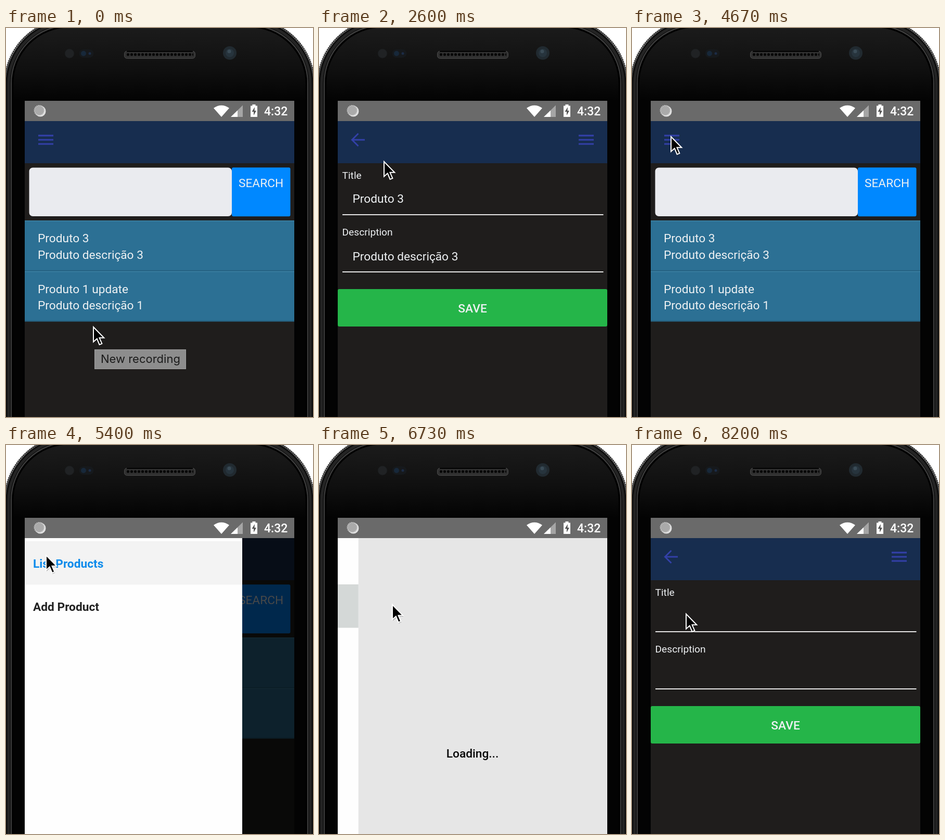
An HTML page that plays this animation: 590x748 px, repeating every 8270 ms.

```html
<!DOCTYPE html>
<html lang="en">
<head>
<meta charset="utf-8">
<title>Product app</title>
<style>
  html, body { margin: 0; width: 100%; height: 100%; overflow: hidden; background: #fff; }
  svg { display: block; width: 590px; height: 748px; }
  text { font: 22.7px Roboto, sans-serif; fill: #eef1f3; white-space: pre; }
  .medium { font-weight: 500; }
  .bold { font-weight: 700; }
  .label { font-size: 19.2px; }
  .tip { font: 22px Inter, sans-serif; fill: #1b1b1b; }
</style>
</head>
<body>
<svg viewBox="0 0 590 748">
  <defs>
    <linearGradient id="rim" x1="0" y1="0" x2="0" y2="1">
      <stop offset="0" stop-color="#444"/>
      <stop offset=".06" stop-color="#777"/>
      <stop offset=".16" stop-color="#3c3c3c"/>
      <stop offset="1" stop-color="#2a2a2a"/>
    </linearGradient>
    <linearGradient id="face" gradientUnits="userSpaceOnUse" x1="0" y1="0" x2="0" y2="140">
      <stop offset="0" stop-color="#1b1b1b"/>
      <stop offset=".55" stop-color="#101010"/>
      <stop offset="1" stop-color="#030303"/>
    </linearGradient>
    <pattern id="holes" width="7" height="7" x="231" y="47.5" patternUnits="userSpaceOnUse">
      <circle cx="3.5" cy="3.5" r="2.6" fill="#030303"/>
    </pattern>
    <clipPath id="screen"><path d="M36 140H554V748H36Z"/></clipPath>
    <g id="bars" fill="#3340a8">
      <path d="M0 0H29V3.200H0ZM0 8.100H29V11.300H0ZM0 16.100H29V19.300H0Z"/>
    </g>
  </defs>

  <!-- Phone body -->
  <rect x="-2" y="-17" width="594" height="900" rx="125" fill="#0b0b0b" stroke="url(#rim)" stroke-width="3"/>
  <rect x="-2.500" y="-17.500" width="595" height="901" rx="125.500" fill="none" stroke="#333" stroke-width="3" stroke-dasharray="2 2"/>
  <rect x="5" y="-10" width="580" height="900" rx="117" fill="none" stroke="#242424" stroke-width="5"/>
  <rect x="10" y="-5" width="570" height="900" rx="111" fill="url(#face)" stroke="#404040" stroke-width="2"/>
  <rect x="13" y="-2" width="564" height="900" rx="108" fill="none" stroke="#000" stroke-width="3"/>
  <circle cx="122" cy="49" r="9" fill="#202224" stroke="#181a1b"/>
  <rect x="140.500" y="41" width="28" height="16" rx="8" fill="#16191c"/>
  <circle cx="149" cy="49" r="5" fill="#17283a"/>
  <circle cx="161" cy="49" r="2.500" fill="#1c2c46"/>
  <rect x="227.500" y="44.500" width="136" height="14" rx="5" fill="#303030" stroke="#4c4c4c"/>
  <rect x="231" y="47.500" width="129" height="7" fill="url(#holes)"/>
  <path d="M232 45H359" stroke="#000" stroke-width="2"/>
  <circle cx="430" cy="48" r="13" fill="#212a30"/>
  <circle cx="430" cy="48" r="8" fill="#27343d"/>
  <circle cx="429" cy="45" r="3.500" fill="#3a4b56"/>

  <g clip-path="url(#screen)">
    <rect x="36" y="179" width="518" height="569" fill="#1f1d1c"/>
    <g id="list">
      <path d="M36 179H554V260H36Z" fill="#172d4f"/>
      <use href="#bars" x="62" y="205.300"/>
      <rect x="44.500" y="268.500" width="389.500" height="93.500" rx="7" fill="#eaebef"/>
      <rect x="434" y="268.200" width="112.500" height="94" rx="3" fill="#0088ff"/>
      <text x="447" y="306">SEARCH</text>
      <path d="M36 370H554V564.500H36Z" fill="#2c7094"/>
      <path d="M36 371H554M36 468.500H554" stroke="#3c81a3" stroke-width="1.500"/>
      <path d="M36 466.500H554M36 563.500H554" stroke="#245e7d" stroke-width="1.500"/>
      <text x="61" y="412">Produto 3</text>
      <text x="61" y="443.500">Produto descrição 3</text>
      <text x="61" y="509.500">Produto 1 update</text>
      <text x="61" y="541">Produto descrição 1</text>
    </g>
    <g id="form">
      <path d="M36 179H554V748H36Z" fill="#1f1d1c"/>
      <path d="M36 179H554V260H36Z" fill="#172d4f"/>
      <path d="M88 215H64M75.500 203L63.500 215L75.500 227" fill="none" stroke="#3340a8" stroke-width="3"/>
      <use href="#bars" x="499" y="205.300"/>
      <text class="label" x="44.500" y="290">Title</text>
      <text class="label" x="44.500" y="399">Description</text>
      <path d="M45 359H546.500M45 469H546.500" stroke="#e6e6e6" stroke-width="2"/>
      <g id="values">
        <text x="64.500" y="336">Produto 3</text>
        <text x="64.500" y="446.500">Produto descrição 3</text>
      </g>
      <rect x="36" y="502" width="518" height="72" rx="3" fill="#25b549"/>
      <text class="medium" x="295" y="547" text-anchor="middle">SAVE</text>
    </g>
    <g id="loading">
      <path d="M36 179H554V748H36Z" fill="#f6f6f6"/>
      <text class="medium" x="295" y="601" text-anchor="middle" style="fill:#080808">Loading...</text>
    </g>
    <path id="shade" d="M36 179H554V748H36Z" fill="#000"/>
    <g id="drawer">
      <path d="M36 179H454V748H36Z" fill="#fefefe"/>
      <path id="active" d="M36 185H454V268.500H36Z" fill="#f3f3f3"/>
      <path id="pressed" d="M36 268H454V351.500H36Z" fill="#d4d8d7"/>
      <text class="bold" x="52" y="236" style="fill:#0d8beb">List Products</text>
      <text class="bold" x="52" y="319" style="fill:#222">Add Product</text>
    </g>

    <!-- Status bar -->
    <path d="M36 140H554V179H36Z" fill="#6a6a6a"/>
    <circle cx="66" cy="160" r="10.500" fill="#e2e2e2"/>
    <circle cx="64" cy="158.500" r="9.500" fill="#aaa" stroke="#d0d0d0" stroke-width="2" stroke-dasharray="1.500 1.500"/>
    <path d="M399 154Q414 143.500 429 154L414 171Z" fill="#fff"/>
    <path d="M432 171L455 148.500V171Z" fill="#a5a5a5"/>
    <path d="M432 171L445 158.500V171Z" fill="#fff"/>
    <path d="M470 149.500H473.500V147H479.500V149.500H483V171H470Z" fill="#fff"/>
    <path d="M478 152L472.500 161H476V168L481 159H477.500Z" fill="#555"/>
    <text class="medium" x="496" y="168" style="font-size:23px;fill:#fff">4:32</text>
  </g>

  <g id="tooltip">
    <rect x="170.500" y="618.500" width="175" height="37" fill="#8d8d8d" stroke="#a0a0a0"/>
    <text class="tip" x="182" y="644">New recording</text>
  </g>
  <g id="cursor">
    <g id="ring" fill="none">
      <circle cy="2" r="42.800" stroke="#fff" stroke-width="6"/>
      <circle cy="2" r="42.800" stroke="#000" stroke-width="3"/>
    </g>
    <path d="M1 2V31L7.500 25L12.500 36L17.500 33.800L12.600 23H21.500Z" fill="#000" opacity=".25"/>
    <path d="M0 0V28.500L6.800 22.500L11.600 34L16.400 32L11.500 20.800H20.300Z" fill="#000" stroke="#fff" stroke-width="2"/>
  </g>
</svg>
<script>
  const LOOP = 8270, STEP = 1000 / 15;
  const part = Object.fromEntries([...document.querySelectorAll("g[id], path[id]")].map(e => [e.id, e]));

  // Pointer stops: time, x, y
  const stops = [
    [0, 168, 575], [500, 168, 575], [1250, 177, 409], [1730, 177, 409],
    [2600, 125, 257], [3270, 75, 209], [4670, 75, 209], [5400, 77, 212],
    [6050, 141, 307], [7660, 141, 307], [8200, 104, 325], [LOOP, 104, 325]
  ];
  const clicks = [[1400, 1535], [3600, 3735], [4760, 4895], [6130, 6265]];

  const progress = (t, from, to) => Math.min(1, Math.max(0, (t - from) / (to - from)));
  const easeOut = p => 1 - (1 - p) ** 2;
  const smooth = p => p * p * (3 - 2 * p);
  const within = (t, from, to) => t >= from && t < to;
  const show = (el, on) => el.setAttribute("display", on ? "inline" : "none");
  const move = (el, x, y) => el.setAttribute("transform", `translate(${x} ${y})`);

  function pointer(t) {
    const i = Math.max(1, stops.findIndex(s => s[0] > t));
    const [t0, x0, y0] = stops[i - 1], [t1, x1, y1] = stops[i];
    const p = smooth(progress(t, t0, t1));
    return [x0 + (x1 - x0) * p, y0 + (y1 - y0) * p];
  }

  function draw(t) {
    const enter = easeOut(progress(t, 1535, 1735));
    const detail = within(t, 1535, 4060), blank = t >= 7130;
    show(part.form, detail || blank);
    show(part.values, detail);
    part.form.setAttribute("opacity", detail ? enter : 1);
    move(part.form, 0, detail ? 76 * (1 - enter) : 0);
    show(part.loading, within(t, 6400, 7130));

    const open = easeOut(progress(t, 4930, 5340)) * (1 - easeOut(progress(t, 6400, 6882)));
    show(part.drawer, open > 0);
    move(part.drawer, -418 * (1 - open), 0);
    part.shade.setAttribute("opacity", 0.7 * open);
    show(part.active, t < 6400);
    show(part.pressed, t >= 6190);

    part.tooltip.setAttribute("opacity", 1 - progress(t, 330, 600));
    move(part.cursor, ...pointer(t));
    show(part.ring, clicks.some(([from, to]) => within(t, from, to)));
  }

  function frame(now) {
    const t = now % LOOP;
    draw(Math.floor((t + 4) / STEP) * STEP);
    requestAnimationFrame(frame);
  }
  draw(0);
  requestAnimationFrame(frame);
</script>
</body>
</html>
```
